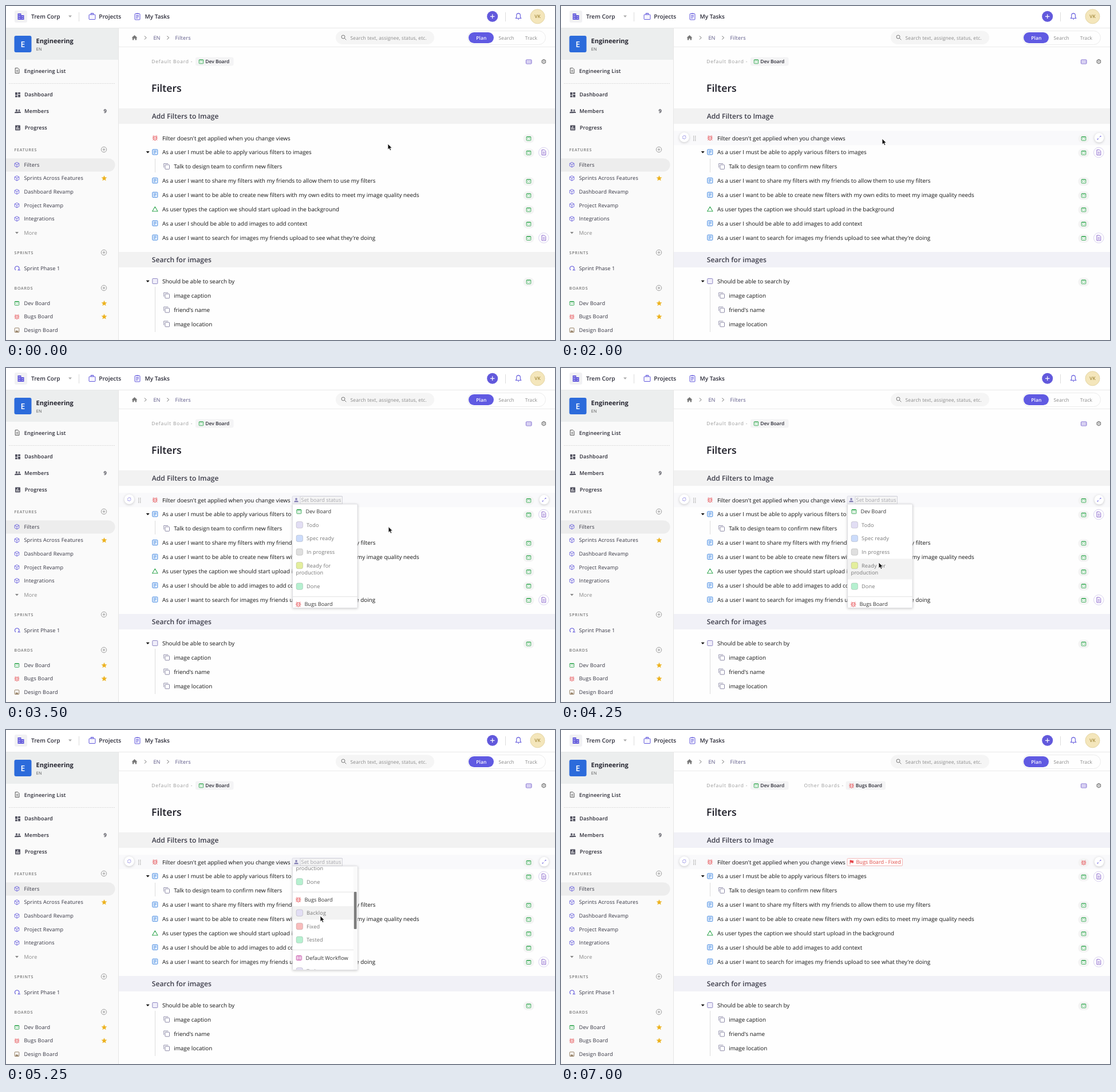
Recreate the animation shown at these times as an HTML page. Size 959 by 584 pixels, loop 7.25 s.

```html
<!DOCTYPE html>
<html lang="en">
<head>
<meta charset="utf-8">
<title>Task filters</title>
<style>
html, body { margin: 0; width: 100%; height: 100%; overflow: hidden; background: #fefefe; }
svg { display: block; width: 959px; height: 584px; font-family: "Open Sans", sans-serif; }
text { white-space: pre; text-rendering: geometricPrecision; }
.float { filter: drop-shadow(0 1px 2px #0003); }
</style>
</head>
<body>
<svg id="stage" viewBox="0 0 959 584" xmlns="http://www.w3.org/2000/svg"></svg>
<script>
const LOOP = 7250, STEP = 250;
const PURPLE = '#6259dc', GREEN = '#35a853', RED = '#e5484d', BLUE = '#3f86e0', GRAY = '#777', INK = '#151515';

// Drawing helpers; text is placed by the vertical centre of its capitals.
const text = (x, y, str, size, fill = INK, weight = 400, spacing = 0, anchor = 'start') =>
  `<text x="${x}" y="${y + size * .36}" font-size="${size}" fill="${fill}" font-weight="${weight}" letter-spacing="${spacing}" text-anchor="${anchor}">${str}</text>`;
const rect = (x, y, w, h, fill, r = 0, stroke = 'none') =>
  `<rect x="${x}" y="${y}" width="${w}" height="${h}" rx="${r}" fill="${fill}" stroke="${stroke}"/>`;
const circle = (x, y, r, fill, stroke = 'none', width = 1) =>
  `<circle cx="${x}" cy="${y}" r="${r}" fill="${fill}" stroke="${stroke}" stroke-width="${width}"/>`;
const line = (d, stroke, width = 1, extra = '') =>
  `<path d="${d}" fill="none" stroke="${stroke}" stroke-width="${width}" ${extra}/>`;
const shape = (d, fill) => `<path d="${d}" fill="${fill}"/>`;
const at = (x, y, content, scale = 1) => `<g transform="translate(${x} ${y}) scale(${scale})">${content}</g>`;

// Icons are centred on 0,0.
const icon = {
  story: rect(-4.5, -4.5, 9, 9, '#eef5fe', 1, BLUE) + line('M-2.5-2h5M-2.5 0h5M-2.5 2h3', BLUE, .9),
  task: rect(-4.5, -4.5, 9, 9, '#f0eefa', 1, '#8c85c0'),
  enhancement: line('M0-4L4.7 4H-4.7Z', GREEN, 1.1, 'stroke-linejoin="round"'),
  bug: line('M-2.3-.5A2.3 2.3 0 0 1 2.3-.5V2A2.3 2.3 0 0 1-2.3 2Z', RED, .9) +
    line('M-1.7-2L-3.2-4.3M1.7-2L3.2-4.3M-2.5.6H-4.8M2.5.6H4.8M-2.2-1L-4.4-2M2.2-1L4.4-2M-2.2 2.4L-4.2 4M2.2 2.4L4.2 4M-.9 0h1.8M-.9 1.8h1.8', RED, .8),
  subtask: line('M-4.8 2.2V-4.8H2.8', '#8a87a5', .9) + rect(-2.6, -2.6, 7.6, 7.6, '#fff', .8, '#8a87a5'),
  board: rect(-4, -3.5, 8, 7.2, '#fff', 1, GREEN) + line('M-4-2.6h8', GREEN, 1) + line('M-1-.7L-2.2.6-1 1.9M1-.7L2.2.6 1 1.9', GREEN, .8),
  workflow: rect(-4.5, -3.5, 9, 7.5, '#fff', .8, '#c03ca0') + line('M-1.5-3.5v7.5M1.5-3.5v7.5', '#c03ca0'),
  image: rect(-4, -4, 8, 8, '#fff', 1, '#8b7355') + shape('M-3 3L-1 0 .5 1.5 1.5.5 3 3Z', '#8b7355'),
  doc: line('M-3.3-4.5H1.3L3.5-2.2V4.5H-3.3ZM-1.6-.6H1.8M-1.6 1.8H1.8', 'currentColor', .9),
  cube: line('M0-4.5L4-2.5V2.3L0 4.5-4 2.3V-2.5ZM-4-2.5L0-.3 4-2.5M0-.3V4.5', PURPLE, .9),
  star: shape('M0-5L1.4-1.6 5-1.4 2.2.9 3.1 4.4 0 2.5-3.1 4.4-2.2.9-5-1.4-1.4-1.6Z', '#edb21f'),
  add: circle(0, 0, 4.7, 'none', '#888', .8) + line('M-2.5 0h5M0-2.5v5', '#888', .8),
  person: circle(0, -2.2, 2.1, 'currentColor') + shape('M-4.3 4.2V3C-4.3 0 4.3 0 4.3 3V4.2Z', 'currentColor'),
  flag: shape('M-3.5-4H-.2L.3-3H4V2H.7L.2 1H-2.4V4.5H-3.5Z', 'currentColor'),
  calendar: line('M-4.2-3.3H4.2V4.3H-4.2ZM-2.3-5v2M2.3-5v2', '#666') + line('M-4.2-2.6H4.2', '#666', 1.4),
  stopwatch: circle(0, .6, 3.7, 'none', '#666') + line('M-1.3-4.6h2.6M0-1.5V1M3-2.6l1-1', '#666'),
  section: circle(0, 0, 4.6, '#f1ebfc', '#7a4fd0') + text(0, 0, 'S', 6, '#7a4fd0', 700, 0, 'middle'),
  gear: line('M0-3.6L3.1-1.8V1.8L0 3.6-3.1 1.8V-1.8Z', GRAY, 1.3, 'stroke-linejoin="round"') + circle(0, 0, 1.2, 'none', GRAY, .8),
  refresh: line('M-2.8.3A2.8 2.8 0 0 1 2-2M2.8-.3A2.8 2.8 0 0 1-2 2', '#8880e0', .8) + shape('M2.9-2.9V-1L1.2-1.5ZM-2.9 2.9V1L-1.2 1.5Z', '#8880e0'),
  expand: line('M.8-.8L3-3M-.8.8L-3 3', PURPLE, .8) + shape('M1.2-3.3H3.3V-1.2ZM-1.2 3.3H-3.3V1.2Z', PURPLE),
  pointer: `<path d="M0 0V10.2L2.3 8 3.9 11.6 5.8 10.8 4.2 7.3H7.3Z" fill="#111" stroke="#fff" stroke-width=".8"/>`,
};
const tinted = (name, color) => `<g color="${color}">${icon[name]}</g>`;
const disclosure = (x, y, color) => shape(`M${x - 3} ${y - 1.5}h6l-3 3.5z`, color);

const rows = [
  ['bug', "Filter doesn't get applied when you change views"],
  ['story', 'As a user I must be able to apply various filters to images', 1],
  ['subtask', 'Talk to design team to confirm new filters'],
  ['story', 'As a user I want to share my filters with my friends to allow them to use my filters'],
  ['story', 'As a user I want to be able to create new filters with my own edits to meet my image quality needs'],
  ['enhancement', 'As user types the caption we should start upload in the background'],
  ['story', 'As a user I should be able to add images to add context'],
  ['story', "As a user I want to search for images my friends upload to see what they're doing", 1],
];
const moreRows = [['task', 'Should be able to search by'], ['subtask', 'image caption'], ['subtask', "friend's name"], ['subtask', 'image location']];

function topBar() {
  return rect(0, 0, 959, 38.5, '#fff') + line('M0 38.5H959', '#e8e8e8') +
    rect(15, 8, 22, 21, '#f1f1f3', 3) + shape('M20.5 13h6v3h5v8h-11z', PURPLE) +
    line('M22 15.5h3M22 18.5h3M22 21.5h3M27.5 18.5h2.5M27.5 21.5h2.5', '#f1f1f3', 1.2, 'stroke-dasharray="1.2 .6"') +
    text(44, 18.5, 'Trem Corp', 10.1, '#2d2d3a', 600) + disclosure(112, 18, '#aaa') +
    line('M127.5 11V27M872.5 11V27', '#ddd') +
    rect(145, 15, 11, 8.5, '#f6f5fd', 1, PURPLE) + line('M148.5 15v-2.2h4V15', PURPLE, 1.2) +
    text(162.3, 18.5, 'Projects', 10.05, '#2d2d3a', 600) +
    rect(225, 13.5, 9, 10.5, '#f6f5fd', 1, PURPLE) + line('M227.5 13h4M227 16.5h5M227 18.7h5M227 21h3', PURPLE, 1.1) +
    text(242.5, 18.5, 'My Tasks', 10.05, '#2d2d3a', 600) +
    circle(849.7, 18.3, 9.5, PURPLE) + line('M846 18.3h7.4M849.7 14.6V22', '#fff', 1.2) +
    line('M890.5 21.5h9.2l-1.3-2v-3.3a3.3 3.3 0 0 0-6.6 0v3.3zM894 23.3h2.2M895.1 12.8v-.9', PURPLE, 1.1) +
    circle(928.5, 18.3, 12.5, '#f4e6bb', '#e4d5a3') + text(928.5, 18.4, 'VK', 8.2, '#a58b3d', 600, 0, 'middle');
}

function sidebar() {
  const heading = (y, label) => text(14.5, y, label, 7, GRAY, 600, .8) + at(171, y, icon.add);
  const entry = (y, label, mark, starred) => at(19, y, icon[mark], .95) +
    text(31.4, y, label, 9.15, '#333340', 400, .19) + (starred ? at(171.5, y, icon.star) : '');
  const page = (x, y, label) => text(x, y, label, 9.15, '#2a2a35', 600, .17);
  return rect(0, 39, 196, 545, '#fafafa') + rect(0, 39, 196, 55, '#eceeee') + line('M196.5 39V584', '#e6e6e6') +
    rect(14.5, 52, 30, 29, '#2c6bdb', 3) + text(29.5, 66.6, 'E', 14, '#fff', 600, 0, 'middle') +
    text(52.6, 61, 'Engineering', 11.05, '#252530', 700) + text(52.7, 75.5, 'EN', 7.3, '#555', 400, .2) +
    at(19.5, 113, tinted('doc', '#444')) + page(31.8, 113.5, 'Engineering List') +
    line('M5 135.5H191', '#ddd', 1, 'stroke-dasharray="2 1"') +
    shape('M16 151h4v4.5h-4zM21 151h4v3h-4zM16 156.5h4v3h-4zM21 155h4v4.5h-4z', '#555563') + page(32.2, 155, 'Dashboard') +
    at(18.5, 184, tinted('person', '#555563'), .8) + at(23, 184, tinted('person', '#555563'), .7) + page(32.2, 184, 'Members') +
    text(170.5, 184, '9', 9.15, '#2a2a35', 600) +
    rect(16, 208.5, 9, 9, '#555563', 1) + line('M18.3 212v4M20.5 210v6M22.7 213.5v2.5', '#fff') + page(32.7, 213, 'Progress') +
    heading(251, 'FEATURES') + shape('M0 266.5H179a11.5 11.5 0 0 1 0 23H0Z', '#ededed') +
    ['Filters', 'Sprints Across Features', 'Dashboard Revamp', 'Project Revamp', 'Integrations']
      .map((label, i) => entry(277.6 + 23.6 * i, label, 'cube', i === 1)).join('') +
    disclosure(19, 396.5, '#888') + text(31.4, 396.5, 'More', 9.15, '#888', 400, .19) +
    heading(431, 'SPRINTS') + line('M17 461.8A3.8 3.8 0 1 1 21.5 461.8H25', PURPLE, 1.1) +
    text(31.4, 459, 'Sprint Phase 1', 9.15, '#333340', 400, .14) +
    heading(493, 'BOARDS') + entry(519.8, 'Dev Board', 'board', true) +
    entry(543.2, 'Bugs Board', 'bug', true) + entry(566.8, 'Design Board', 'image');
}

function pageHeader(assigned) {
  const chip = (x, w, label, mark) => rect(x, 89.5, w, 15, '#f4f4f5', 3) + at(x + 10, 97.2, icon[mark], .95) +
    text(x + 17.3, 97.4, label, 8.45, '#2a2a35', 600);
  return line('M197 71.5H959', '#ebebeb') +
    shape('M219.5 55.5l5-4.5 5 4.5h-1.4v4h-2.5v-2.7h-2.2v2.7h-2.5v-4z', GRAY) +
    line('M242 52.5l3 3-3 3M281.5 52.5l3 3-3 3', '#666') +
    text(257.4, 55.5, 'EN', 9.15, '#5a5685') + text(295.6, 55.5, 'Filters', 9.15, '#5a5685', 400, .2) +
    rect(576, 43.5, 172, 23.5, '#f5f5f5', 11.7) + circle(589, 54, 3, 'none', GRAY) + line('M591.3 56.3l3 3', GRAY) +
    text(601.5, 55.6, 'Search text, assignee, status, etc.', 8.45, '#888', 400, .14) +
    rect(806.5, 43.5, 136, 24, '#fefefe', 12, '#ececec') + rect(808, 46, 44, 19, '#605ae2', 9.5) +
    text(830.3, 55.6, 'Plan', 8.45, '#fff', 600, .1, 'middle') + text(860.5, 55.6, 'Search', 8.45, '#888', 400, .14) +
    text(906.8, 55.6, 'Track', 8.45, '#888', 400, .14) +
    text(254.3, 97.3, 'Default Board -', 8.45, '#999', 400, .84) + chip(331, 66.5, 'Dev Board', 'board') +
    (assigned ? text(424.5, 97.3, 'Other Boards -', 8.45, '#999', 400, .84) + chip(497.5, 69.5, 'Bugs Board', 'bug') : '') +
    rect(908.5, 94, 9.5, 7, '#f3f0fc', 1, '#7b66cf') + line('M910 96.3h7M910 98.6h7', '#7b66cf', 1, 'stroke-dasharray="1 1"') +
    at(939.4, 97.2, icon.gear) +
    text(254, 144, 'Filters', 17.7, '#1c1c26', 600);
}

const rowY = i => 231 + 24.9 * i;

function rowItem([mark, label, hasDoc], y, boardMark) {
  const nested = mark === 'subtask';
  return at(nested ? 280.5 : 260.3, y - .5, icon[mark]) + text(nested ? 293.2 : 273, y, label, 9.856) +
    (nested ? '' : rect(903.5, y - 6.5, 19, 15, '#f4f4f4', 7) + at(913, y + .7, icon[boardMark], .95)) +
    (hasDoc ? circle(939.3, y + .2, 8.8, '#fff', '#d9d2ee') + at(939.3, y + .2, tinted('doc', '#7d55c7')) : '');
}

function hoverTools(y) {
  const dots = [0, 1].flatMap(c => [0, 1, 2, 3].map(r => rect(231 + 3 * c, y - 4 + 2.5 * r, 1.4, 1.4, '#aaa'))).join('');
  return `<g class="float">${circle(215.3, y - 1.5, 8.6, '#fff')}${circle(940, y - .7, 8.3, '#fff')}</g>` +
    at(215.3, y - 1.5, icon.refresh) + at(940, y - .7, icon.expand) + dots;
}

function outline(s) {
  const band = (y, label, lavender) => rect(197, y, 762, 27, lavender ? '#f1f1f7' : '#f2f2f2') +
    text(254.8, y + 13.7, label, 12.1, '#3c3c49', 600);
  const rowBack = (y, fill) => rect(197, y - 12.6, 762, 25, fill);
  return band(179, 'Add Filters to Image', s.assigned) + band(430, 'Search for images', s.time >= 250) +
    (s.menu ? rowBack(rowY(0), '#eeeef9') : s.editing ? rowBack(rowY(0), '#f9f9fb') : '') +
    (s.hoverLower ? rowBack(rowY(5), '#f9f9fa') : '') +
    line('M260.5 267V291M260.5 491V570', '#ddd') + disclosure(247.7, 255.6, INK) + disclosure(247.7, 481.2, INK) +
    rows.map((row, i) => rowItem(row, rowY(i), s.assigned && !i ? 'bug' : 'board')).join('') +
    moreRows.map((row, i) => rowItem(row, 481.6 + 24.9 * i, 'board')).join('') +
    (s.editing && !s.menu ? hoverTools(rowY(0)) : '') + (s.hoverLower ? hoverTools(rowY(5)) : '');
}

function contextMenu({ x, y }) {
  const tool = y > 254 && y < 280 ? Math.floor((x - 567) / 37.2) : -1;
  const title = (cy, label) => text(575.8, cy, label, 8.2, '#2a2a35', 600);
  const item = (cx, cy, label) => text(cx, cy, label, 8.7, '#5c5c5c', 400, .12);
  const kinds = ['task', 'story', 'enhancement', 'section'];
  return `<g class="float">${rect(567.5, 232.5, 148, 289, '#fff', 2, '#e2e2e6')}</g>` + title(244, 'Special Tags') +
    (tool >= 0 ? rect(567 + 37 * tool, 255, 31, 24, '#f2f2f7') : '') +
    at(586, 265.7, tinted('person', '#666')) + at(623.7, 265.7, icon.calendar) + at(660.7, 265.7, icon.stopwatch) +
    at(697, 265.5, tinted('flag', GRAY)) + line('M568 279.5H715M568 327.5H715M568 446.5H715', '#e5e5e9') +
    title(291.5, 'Add to Sprint') + rect(577, 307, 19, 11.5, '#efeafa', 5) + text(586.5, 312.8, '#1', 7.2, '#7648c8', 600, 0, 'middle') +
    item(602.7, 313, 'Sprint Phase 1') + title(340, 'Change to') +
    kinds.map((kind, i) => at(582, 360.8 + 24.3 * i, icon[kind], .9) +
      item(593.5, 361.2 + 24.3 * i, kind[0].toUpperCase() + kind.slice(1))).join('') +
    ['Edit details', 'Archive', 'Delete'].map((label, i) => item(575.8, 461.2 + 24.2 * i, label)).join('');
}

// Status list: [label, centre y, swatch colour or board icon]
const statuses = [
  ['Dev Board', 251, 'board'], ['Todo', 274.6, '#e2def4'], ['Spec ready', 298.2, '#ccdcfb'], ['In progress', 321.9, '#dfdfdf'],
  ['Ready for', 345.5, '#e3ee9d'], ['Done', 382, '#b6f0d0'],
  ['Bugs Board', 413, 'bug'], ['Backlog', 436.5, '#e2def4'], ['Fixed', 460, '#f8bcbc'], ['Tested', 483.6, '#b6f0d0'],
  ['Default Workflow', 514.8, 'workflow'], ['Todo', 538, '#e2def4'], ['Done', 561.6, '#b6f0d0'],
];

function statusList({ x, y }, scroll) {
  const items = statuses.map(([label, cy, mark]) => {
    if (icon[mark]) return at(mark === 'bug' ? 510.7 : 511.8, cy, icon[mark]) + text(mark === 'bug' ? 521.4 : 523.6, cy, label, 9.2, '#333');
    const top = cy - 12, height = label === 'Ready for' ? 36 : 23.6, pointed = y + scroll - top;
    const hovered = x < 612 && pointed >= 0 && pointed < height;
    return (hovered ? rect(501, top, 113, height, '#f2f2f2') : '') +
      rect(507, cy - 6, 11.5, 11.5, mark, 3, '#0002') + text(525, cy, label, 9.15, GRAY, 400, .17) +
      (height > 30 ? text(506.5, cy + 12.7, 'production', 9.15, GRAY, 400, .1) : '');
  }).join('');
  return `<g class="float">${rect(500.5, 238, 113.5, 181.5, '#fff', 1, '#e0e0e4')}</g>
    <clipPath id="list">${rect(501, 238.5, 113, 180.5, '#000')}</clipPath>
    <g clip-path="url(#list)">${at(0, -scroll, items + line('M501 399.8H614M501 501H614', '#e2e2e2'))}
    ${scroll ? rect(607, 238, 7, 182, '#fafafa') + rect(607.8, 240 + scroll * .37, 4.7, 65, '#7d7d7d', 1) : ''}</g>`;
}

function statusTag(s) {
  if (s.assigned) return rect(500, 224.5, 96.5, 13, '#fffafa', 1.5, '#f3bcbc') + at(507.5, 230.8, tinted('flag', RED), .85) +
    text(515.5, 231, 'Bugs Board - Fixed', 9.05, '#e0544f');
  if (!s.list) return '';
  return rect(500, 224, 87.5, 14, '#f1f1f6', 1.5, '#dcdce6') + at(507, 231, tinted('person', '#8580b5'), .85) +
    rect(514, 224.5, 73.5, 13, '#f5f5f5', 0, '#d5d5dc') + text(515.6, 231, 'Set board status', 9.2, '#a5a5ab');
}

const cursorPath = [[0, 667, 241], [250, 656, 240], [1250, 561, 232], [2000, 561, 232], [2250, 567, 232], [3000, 689, 266],
  [3250, 689, 266], [4250, 555, 340], [4500, 555, 340], [5000, 549, 325], [5250, 549, 325], [5500, 548, 346], [LOOP, 548, 346]];
const scrollPath = [[0, 0], [4500, 0], [5000, 116.5], [LOOP, 116.5]];

function sample(path, time) {
  const i = path.findIndex(p => p[0] > time), [a, b] = [path[i - 1], path[i]];
  const u = (time - a[0]) / (b[0] - a[0]), eased = u * u * (3 - 2 * u);
  return a.slice(1).map((v, k) => v + (b[k + 1] - v) * eased);
}

function scene(time) {
  const within = (from, to) => time >= from && time < to;
  const [x, y] = sample(cursorPath, time), [scroll] = sample(scrollPath, time);
  const s = {
    time, editing: time >= 250, menu: within(2250, 3250), list: within(3250, 5750),
    assigned: time >= 5750, hoverLower: within(5750, 6750),
  };
  const caretX = within(1000, 1250) || within(1500, 2000) ? 499.5 : within(6000, 6500) ? 599.5 : 0;
  return rect(0, 0, 959, 584, '#fefefe') + topBar() + sidebar() + pageHeader(s.assigned) + outline(s) + statusTag(s) +
    (caretX ? line(`M${caretX} 224V237`, '#222') : '') +
    (s.menu ? contextMenu({ x, y }) : '') + (s.list ? statusList({ x, y }, scroll) : '') +
    (time < 6750 ? at(x, y, icon.pointer) : '');
}

const stage = document.getElementById('stage'), start = performance.now();
let shown = -1;
function tick() {
  const time = Math.floor((performance.now() - start) % LOOP / STEP) * STEP;
  if (time !== shown) stage.innerHTML = scene(shown = time);
  requestAnimationFrame(tick);
}
tick();
</script>
</body>
</html>
```
